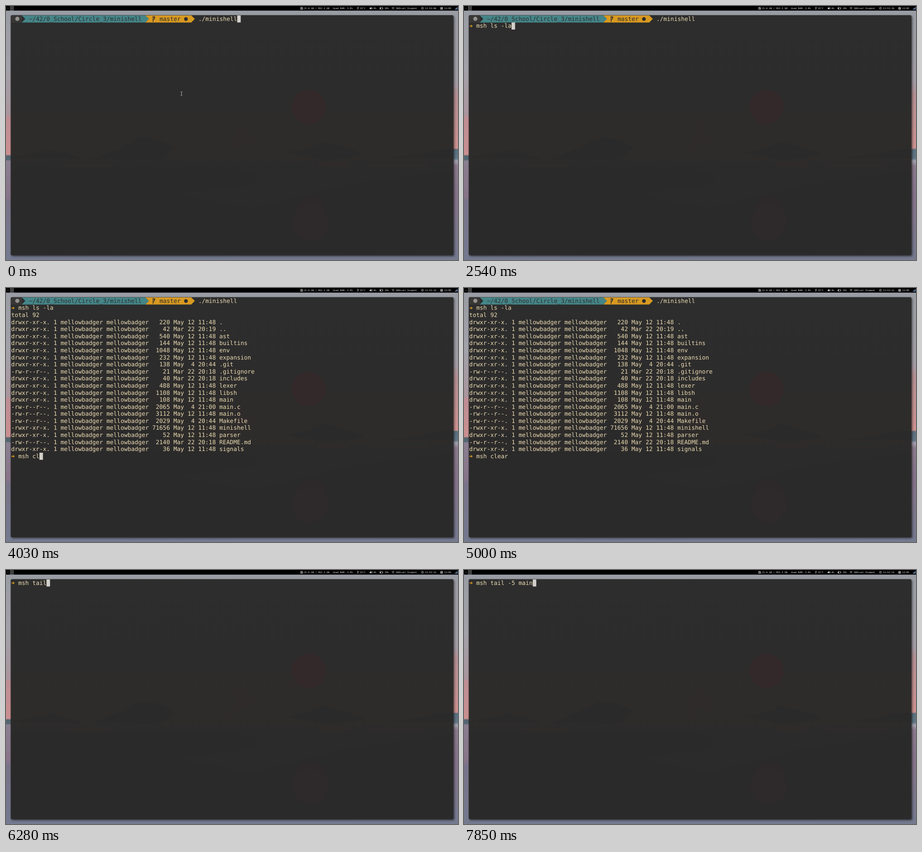
Recreate the animation shown at these times as an HTML page. Size 998 by 561 pixels, loop 8000 ms.

```html
<!DOCTYPE html>
<html lang="en">
<head>
<meta charset="utf-8">
<title>Terminal session</title>
<style>
html, body { margin: 0; width: 100%; height: 100%; overflow: hidden; background: #000; }
svg { display: block; width: 100%; height: 100%; }
text { white-space: pre; text-rendering: geometricPrecision; font-family: "DejaVu Sans Mono", monospace; }
#term text { font-size: 12.95px; fill: #ebdbb2; }
#term .dark { fill: #2d2d2d; }
#bar text { font-size: 5.18px; fill: #e4e4e4; }
#bar .line { fill: none; stroke: #ddd; stroke-width: .7; }
#bar .solid { fill: #ddd; }
</style>
</head>
<body>
<svg viewBox="0 0 998 561" preserveAspectRatio="none">
  <defs>
    <linearGradient id="skyLeft" x2="0" y2="1">
      <stop offset="0" stop-color="#999ca4"/>
      <stop offset=".25" stop-color="#a3a1a9"/>
      <stop offset=".43" stop-color="#aa959d"/>
      <stop offset=".435" stop-color="#bd8e94"/>
      <stop offset=".585" stop-color="#cb8f90"/>
      <stop offset=".59" stop-color="#53646f"/>
      <stop offset=".605" stop-color="#536873"/>
      <stop offset=".61" stop-color="#8b7f91"/>
      <stop offset=".75" stop-color="#89748a"/>
      <stop offset=".77" stop-color="#797389"/>
      <stop offset="1" stop-color="#747a8f"/>
    </linearGradient>
    <linearGradient id="skyRight" x2="0" y2="1">
      <stop offset="0" stop-color="#999ca4"/>
      <stop offset=".3" stop-color="#a29da5"/>
      <stop offset=".35" stop-color="#b58f93"/>
      <stop offset=".56" stop-color="#cd9290"/>
      <stop offset=".565" stop-color="#5b7180"/>
      <stop offset=".6" stop-color="#627786"/>
      <stop offset=".61" stop-color="#a4a2ae"/>
      <stop offset=".63" stop-color="#8b7a8d"/>
      <stop offset=".76" stop-color="#85738a"/>
      <stop offset="1" stop-color="#747a8f"/>
    </linearGradient>
    <linearGradient id="glass" x2="0" y2="1">
      <stop offset="0" stop-color="#2d2d2d"/>
      <stop offset=".35" stop-color="#2d2c2c"/>
      <stop offset=".58" stop-color="#2e2c2a"/>
      <stop offset=".62" stop-color="#2c2b2b"/>
      <stop offset="1" stop-color="#2b2b2b"/>
    </linearGradient>
  </defs>

  <rect width="499" height="561" fill="url(#skyLeft)"/>
  <rect x="499" width="499" height="561" fill="url(#skyRight)"/>

  <rect x="10.4" y="20.3" width="977.6" height="530.4" rx="3" fill="url(#glass)"
        style="filter:drop-shadow(2px 2px 2px #0008)"/>
  <g id="scenery">
    <circle cx="668" cy="223" r="38" fill="#33292a"/>
    <path d="M636 447q32-44 67-12l4 20q-36-14-71-8z" fill="#30292a"/>
    <circle cx="672" cy="478" r="40" fill="#32292a"/>
    <g fill="#2a2a2b">
      <path d="M12 335q50-10 88-17q30 4 70 20z"/>
      <path d="M190 338q60-22 105-46q35-6 77 20q-12 22-40 28z"/>
      <path d="M612 323q45-3 88-23q45 8 95 30l-90 10z"/>
      <path d="M840 336q70-8 120-20h28v20z"/>
      <path d="M12 360h490q50 6 54 22q-8 18-80 22l-90 10q70 22 160 31q110-25 200-50l242-32v184H12z" opacity=".5"/>
    </g>
    <path d="M490 328q18-28 24-68q12 18 30 38q-28 4-54 30zM130 349h100v6H130zM690 345h66v10h-66zM800 349h130v5H800z" fill="#302b2b"/>
  </g>

  <g id="term">
    <g id="banner">
      <path d="M11.4 20.8h24v15.6h-24z" fill="#393736"/>
      <path d="M34.8 20.8h272.9l7.8 7.8-7.8 7.8H34.8l7.8-7.8z" fill="#458588"/>
      <path d="M307.7 20.8H409l7.9 7.8-7.9 7.8H307.7l7.8-7.8z" fill="#d79921"/>
      <circle cx="25" cy="28.3" r="4.6" fill="#92908c"/>
      <text class="dark" x="50.4" y="32.8">~/42/0_School/Circle_3/minishell</text>
      <path d="M324.7 22v13.2M324.7 31l3-2.3V24M326 25.5l1.7-2 1.7 2" fill="none" stroke="#2d2d2d" stroke-width="1.4"/>
      <text class="dark" x="338.9" y="32.8">master</text>
      <circle class="dark" cx="397.3" cy="28.7" r="4"/>
      <text x="424.7" y="32.8">./minishell</text>
    </g>
    <g id="listing"></g>
    <g id="prompt">
      <path d="M12 27.8h3.6v-2.4l3.7 3.3-3.7 3.3v-2.4H12z" fill="#c89020"/>
      <text id="input" x="27.03" y="32.8"></text>
    </g>
    <rect id="cursor" width="7.8" height="15.6" fill="#d3d0cb"/>
  </g>
  <path id="mouse" d="M385.7 189.6h1.3l.5.5.5-.5h1.3M387.5 190v7M385.7 197.4h1.3l.5-.5.5.5h1.3" fill="none" stroke="#c8c8c8" stroke-width=".9"/>

  <g id="bar">
    <rect width="998" height="10.2"/>
    <text x="2.6" y="6.9" style="fill:#777">1</text>
    <rect x="9.3" y="1" width="7.3" height="8.2" fill="#222" stroke="#999" stroke-width=".7"/>
    <text x="11.4" y="6.9">2</text>
    <path class="line" d="M650.6 2.8h3.8l.9.9v3.8h-4.7zM651.7 3v1.4h2.2V3M651.7 7.3V5.8h2.6v1.5"/>
    <text x="658" y="6.9">21.6 GB / 952.3 GB</text>
    <text x="722" y="6.9">Used RAM: 3.9%</text>
    <path class="line" d="M776 5.3V3q.9-1.2 1.8 0v2.3q.9 1.4-.9 2.3-1.8-.9-.9-2.3M778.6 3h1"/>
    <text id="heat" x="781.5" y="6.9"></text>
    <path class="solid" d="M803 4h1.4l1.8-1.7v5.6l-1.8-1.7H803z"/>
    <path class="line" d="M807 3.8q.8 1.3 0 2.6M808 2.8q1.6 2.3 0 4.6"/>
    <text x="811.5" y="6.9">0%</text>
    <path class="line" d="M825.5 3.3h6v3.8h-6zM832.3 4.4v1.6"/>
    <path class="solid" d="M826.2 4h1.6v2.4h-1.6z"/>
    <text id="battery" x="835.9" y="6.9"></text>
    <path class="line" d="M851.5 4.2q3.1-2.6 6.2 0M852.7 5.5q1.9-1.5 3.8 0"/>
    <circle class="solid" cx="854.6" cy="6.8" r=".8"/>
    <text x="861" y="6.9">58Orvel Student</text>
    <circle class="line" cx="919.6" cy="5.1" r="2.4"/>
    <path class="line" d="M919.6 3.6v1.7h-1.2"/>
    <text id="clock" x="925" y="6.9"></text>
    <path class="line" d="M959.5 3.2h4.6v4.3h-4.6zM959.5 4.6h4.6M960.8 2.2v1.2M962.9 2.2v1.2M961.8 4.6v2.9M959.5 6h4.6"/>
    <text x="967.3" y="6.9">12/05</text>
    <path d="M991 6.6h1.1v1.4H991zM992.6 5.3h1.1V8h-1.1zM994.2 3.9h1.1V8h-1.1zM995.8 2.4h1.1V8h-1.1z" fill="#7f9fd0"/>
  </g>
</svg>
<script>
const LOOP = 8000, LEFT = 11.44, TOP = 20.79, CELL = 7.797, ROW = 15.594;
const USER = 'mellowbadger';
const $ = id => document.getElementById(id);

const MODES = { d: 'drwxr-xr-x', f: '-rw-r--r--', x: '-rwxr-xr-x' };
const BUILD = 'May 12 11:48';
const FILES = `d 220 .
d 42 .. Mar 22 20:19
d 540 ast
d 144 builtins
d 1048 env
d 232 expansion
d 138 .git May  4 20:44
f 21 .gitignore Mar 22 20:18
d 40 includes Mar 22 20:18
d 488 lexer
d 1108 libsh
d 108 main
f 2065 main.c May  4 21:00
f 3112 main.o
f 2029 Makefile May  4 20:44
x 71656 minishell
d 52 parser
f 2140 README.md Mar 22 20:18
d 36 signals`.split('\n').map(line => {
  const [mode, size, name, ...date] = line.split(' ');
  return `${MODES[mode]}. 1 ${USER} ${USER} ${size.padStart(5)} ${date.join(' ') || BUILD} ${name}`;
});

// Each prompt: when it opens, its row, the command and its key times.
const PROMPTS = [
  { at: 1620, row: 1, text: 'ls -la', keys: [1850, 2010, 2090, 2260, 2370, 2540] },
  { at: 2730, row: 22, text: 'clear', keys: [3930, 4010, 4100, 4190, 4290] },
  { at: 5060, row: 0, text: 'tail -5 main', keys: [5520, 5620, 5730, 5890, 6440, 6690, 7360, 7440, 7600, 7680, 7770, 7850] }
];
const HIDDEN = [[420, 910], [1400, 1620], [3330, 3840], [5000, 5060], [7270, 7360]];
const TICKS = [480, 2420, 4380, 6280];

const countPast = (times, t) => times.filter(at => at <= t).length;
const show = (el, on) => el.setAttribute('visibility', on ? 'visible' : 'hidden');

function addLine(text, row) {
  const el = document.createElementNS('http://www.w3.org/2000/svg', 'text');
  el.setAttribute('x', LEFT);
  el.setAttribute('y', 32.8 + row * ROW);
  el.textContent = text;
  $('listing').append(el);
}
['total 92', ...FILES].forEach((text, i) => addLine(text, i + 2));

// The first command stays on screen above its output.
const finished = $('prompt').cloneNode(true);
finished.removeAttribute('id');
finished.querySelector('text').removeAttribute('id');
finished.querySelector('text').textContent = 'msh ls -la';
finished.setAttribute('transform', `translate(0 ${ROW})`);
$('listing').append(finished);

function draw(t) {
  const prompt = PROMPTS.filter(p => p.at <= t).pop();
  const typed = prompt ? prompt.text.slice(0, countPast(prompt.keys, t)) : '';
  const row = prompt ? prompt.row : 0;
  const col = prompt ? 6 + typed.length : 64;

  show($('banner'), t < 5060);
  show($('listing'), t >= 2730 && t < 5060);
  show($('prompt'), prompt);
  show($('mouse'), t < 1900);
  show($('cursor'), !HIDDEN.some(([from, to]) => t >= from && t < to));
  $('prompt').setAttribute('transform', `translate(0 ${row * ROW})`);
  $('input').textContent = 'msh ' + typed;
  $('cursor').setAttribute('x', LEFT + col * CELL);
  $('cursor').setAttribute('y', TOP + row * ROW);

  const ticks = countPast(TICKS, t);
  $('clock').textContent = '13:53:' + String(6 + 2 * ticks).padStart(2, '0');
  $('heat').textContent = ticks ? '32°C' : '33°C';
  $('battery').textContent = ticks ? '19%' : '20%';
}

function frame() {
  draw(performance.now() % LOOP);
  requestAnimationFrame(frame);
}
frame();
</script>
</body>
</html>
```
